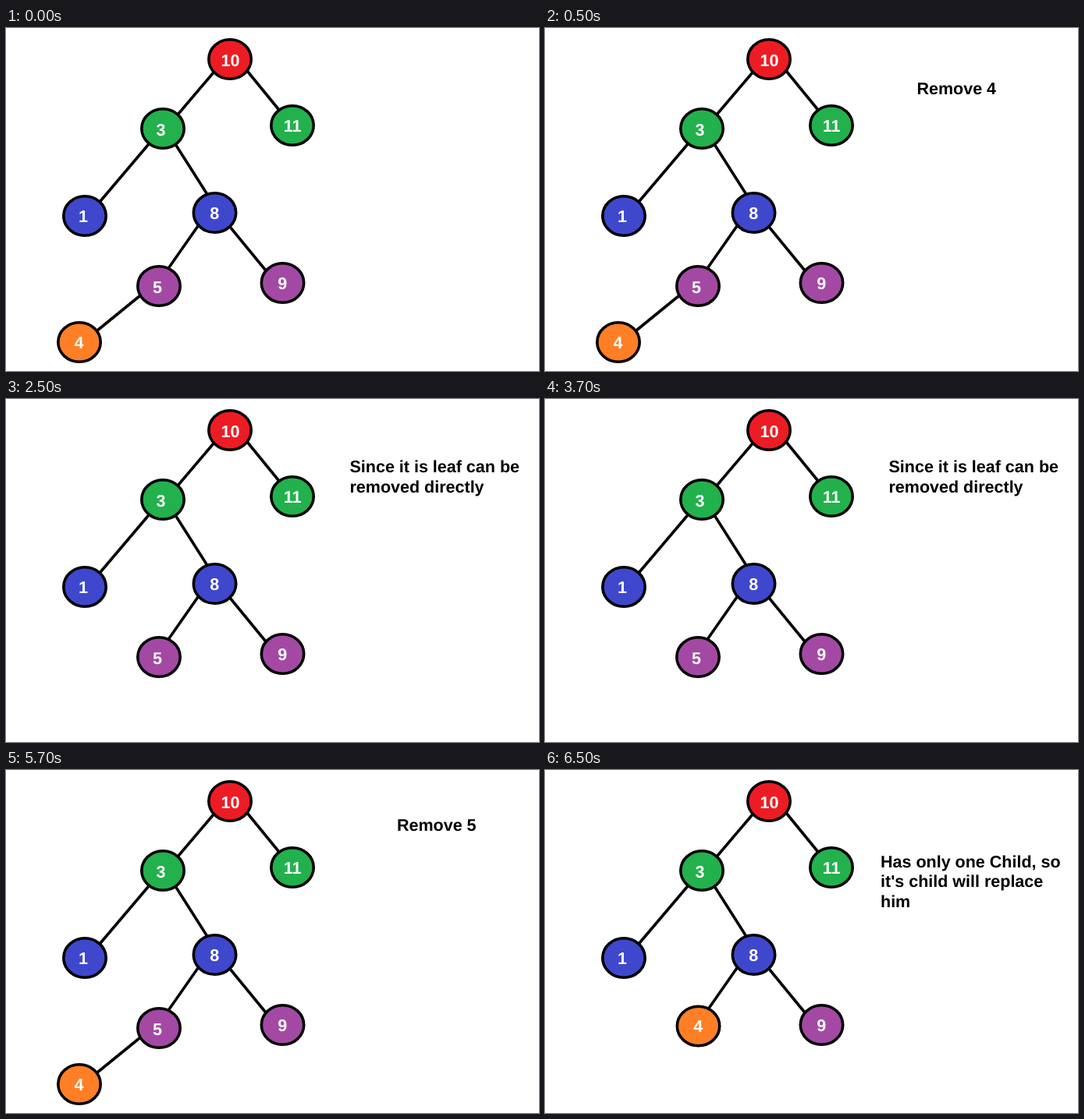
Recreate the animation shown at these times as an HTML page. Size 683 px wide and 440 px high, loop 8 s.

```html
<!DOCTYPE html>
<html lang="en">
<head>
<meta charset="utf-8">
<title>Removing nodes from a binary search tree</title>
<style>
  html, body { margin: 0; width: 100%; height: 100%; overflow: hidden; background: #fff; }
  svg { display: block; width: 100%; height: 100%; }
  text { font: bold 21.5px "Liberation Sans", Arial, sans-serif; text-rendering: geometricPrecision; }
  ellipse, line { stroke: #000; stroke-width: 3.6; stroke-linecap: round; }
  .label { fill: #fff; text-anchor: middle; }
</style>
</head>
<body>
<svg viewBox="0 0 683 440" xmlns="http://www.w3.org/2000/svg"></svg>
<script>
const LOOP = 8000;
const STARTS = [0, 500, 2500, 4500, 6500];
const ALL = [0, 1, 2, 3, 4];
const FULL = [0, 1, 3];
const LINE_STEP = 25.5;
const RED = '#ed1c24', GREEN = '#22b14c', BLUE = '#3f48cc', PURPLE = '#a349a4', ORANGE = '#ff7f27';

// x1, y1, x2, y2, steps
const edges = [
  [266, 57, 221, 110, ALL],
  [309, 55, 349, 104, ALL],
  [182, 150, 121, 222, ALL],
  [217, 149, 257, 212, ALL],
  [246, 254, 209, 307, ALL],
  [287, 255, 332, 310, ALL],
  [171, 344, 117, 388, FULL]
];

// value, colour, centre x, y, label x, baseline, steps
const nodes = [
  [10, RED, 287, 40, 287.5, 49.3, ALL],
  [3, GREEN, 201, 129, 198.5, 137.5, ALL],
  [11, GREEN, 367, 125, 367, 133.3, ALL],
  [1, BLUE, 101, 241, 99, 248.5, ALL],
  [8, BLUE, 267.5, 237, 267.3, 244.8, ALL],
  [5, PURPLE, 196, 331, 194, 339.5, [0, 1, 2, 3]],
  [9, PURPLE, 354.5, 327, 354.3, 334.8, ALL],
  [4, ORANGE, 94, 403, 93.5, 410.5, FULL],
  [4, ORANGE, 196.5, 328.5, 196.3, 336, [4]]
];

// x, first baseline, step, lines
const notes = [
  [476.5, 84.5, 1, ['Remove 4']],
  [440.5, 94, 2, ['Since it is leaf can be', 'removed directly']],
  [501, 78.3, 3, ['Remove 5']],
  [430, 124.8, 4, ['Has only one Child, so', "it's child will replace", 'him']]
];

const svg = document.querySelector('svg');
const parts = [];

function add(tag, attrs, parent, text) {
  const el = document.createElementNS(svg.namespaceURI, tag);
  for (const key in attrs) el.setAttribute(key, attrs[key]);
  if (text !== undefined) el.textContent = text;
  return parent.appendChild(el);
}

function group(steps) {
  const el = add('g', {}, svg);
  parts.push({ el, steps });
  return el;
}

for (const [x1, y1, x2, y2, steps] of edges) {
  add('line', { x1, y1, x2, y2 }, group(steps));
}
for (const [value, fill, cx, cy, x, y, steps] of nodes) {
  const g = group(steps);
  add('ellipse', { cx, cy, rx: 27.2, ry: 25.2, fill }, g);
  add('text', { x, y, class: 'label' }, g, value);
}
for (const [x, y, step, lines] of notes) {
  const g = group([step]);
  lines.forEach((line, i) => add('text', { x, y: y + i * LINE_STEP }, g, line));
}

let shown = -1;
function draw(now) {
  const t = now % LOOP;
  const step = STARTS.filter(s => s <= t).length - 1;
  if (step !== shown) {
    shown = step;
    for (const { el, steps } of parts) {
      el.style.display = steps.includes(step) ? '' : 'none';
    }
  }
}

const start = performance.now();
function tick() {
  draw(performance.now() - start);
  requestAnimationFrame(tick);
}
tick();
</script>
</body>
</html>
```
